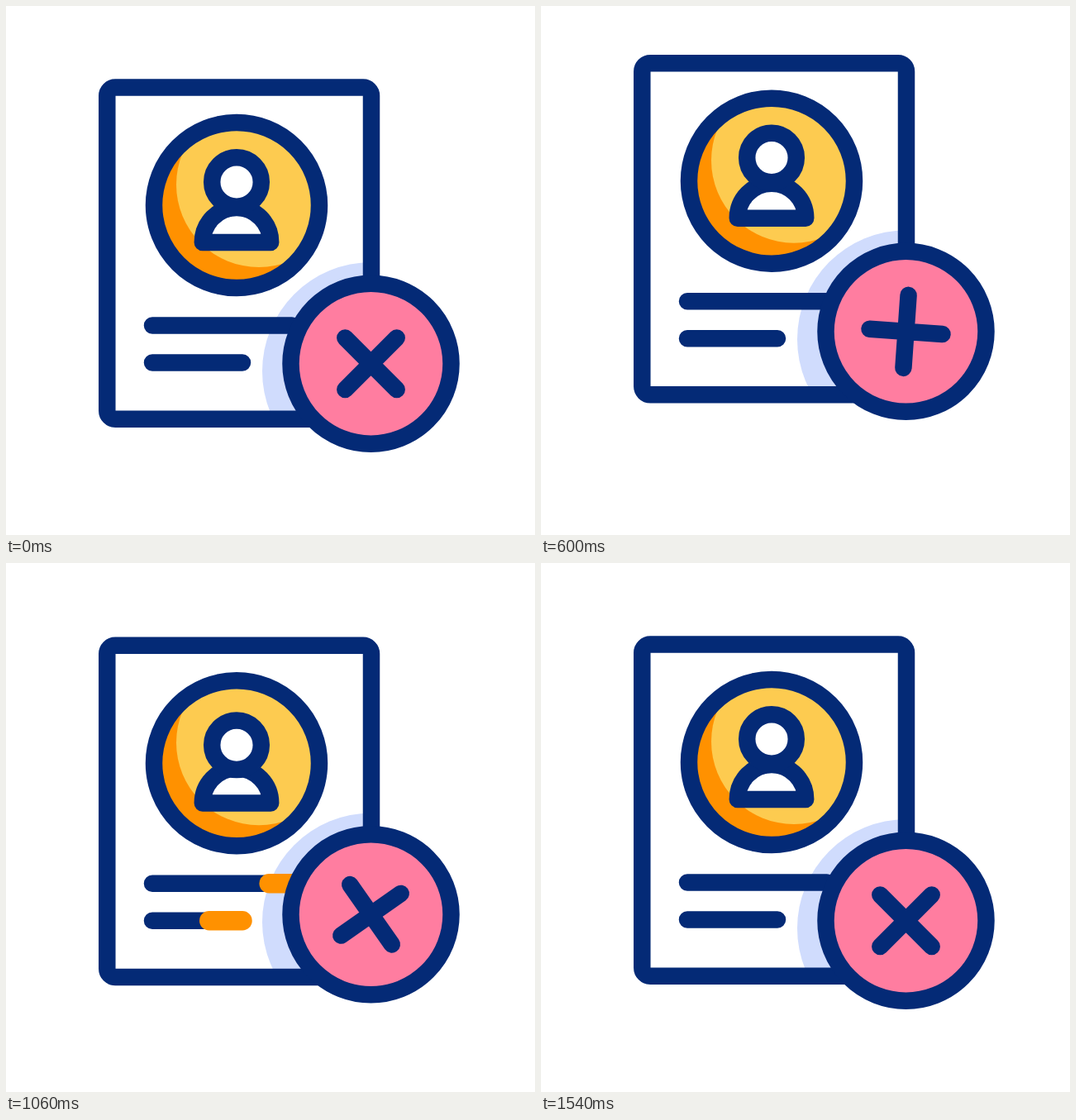
Write an HTML page that moves like this. It is 640 px wide and 640 px high and loops after 1.66 s.

```html
<!DOCTYPE html>
<html lang="en">
<head>
<meta charset="utf-8">
<style>
  html, body { margin: 0; width: 100%; height: 100%; overflow: hidden; background: #fff; }
  svg { display: block; width: 100%; height: 100%; }
  .ink { stroke: #042a76; stroke-width: 20.5; stroke-linecap: round; stroke-linejoin: round; }
  .accent { stroke: #ff9100; stroke-width: 23.5; stroke-linecap: round; }
</style>
</head>
<body>
<svg viewBox="0 0 640 640">
  <defs>
    <clipPath id="page"><rect x="122" y="98" width="320" height="401"/></clipPath>
    <clipPath id="disc"><circle cx="279" cy="241" r="100"/></clipPath>
  </defs>
  <g id="card">
    <g clip-path="url(#page)"><circle id="halo" cx="442" cy="442" r="132" fill="#d0dcfd"/></g>
    <rect class="ink" x="122.3" y="98.5" width="319.7" height="401.2" rx="10" fill="none"/>
    <g clip-path="url(#disc)">
      <circle cx="279" cy="241" r="100" fill="#ff9100"/>
      <circle cx="306" cy="216" r="100" fill="#fdcb50"/>
    </g>
    <circle class="ink" cx="279" cy="241" r="100" fill="none"/>
    <path id="body" class="ink" d="M237.8 286a41.2 42 0 0 1 82.4 0z" fill="#fff"/>
    <circle id="head" class="ink" cx="279" cy="213" r="29.8" fill="#fff"/>
    <path class="ink" d="M177 386.5H346M177 431.5H286"/>
    <line id="sweepLong" class="accent" y1="386.5" y2="386.5"/>
    <line id="sweepShort" class="accent" y1="431.5" y2="431.5"/>
  </g>
  <g id="badge">
    <circle class="ink" cx="441.5" cy="432.7" r="97" fill="#ff7da0"/>
    <path id="cross" class="ink" d="M410.3 401.5l62.4 62.4M472.7 401.5l-62.4 62.4"/>
  </g>
</svg>
<script>
const LOOP = 1660;
const parts = {};
document.querySelectorAll('[id]').forEach(el => parts[el.id] = el);

const ease = u => (1 - Math.cos(Math.PI * Math.min(1, Math.max(0, u)))) / 2;

// Eased value through [time, value] knots, held at both ends.
function track(knots, t) {
  if (t <= knots[0][0]) return knots[0][1];
  for (let i = 1; i < knots.length; i++) {
    const [t0, a] = knots[i - 1], [t1, b] = knots[i];
    if (t < t1) return a + (b - a) * ease((t - t0) / (t1 - t0));
  }
  return knots[knots.length - 1][1];
}

const bounce = [[260, 0], [410, 20], [670, -39], [910, 20], [1170, -10], [1450, 0]];
const bodySway = [[310, 0], [470, 11], [725, -10], [930, 10], [1220, -6], [1520, 0]];
const headSway = [[330, 0], [475, 9.5], [745, -12], [1000, 8], [1250, -6], [1540, 0]];
const spin = [[200, 0], [357, 20], [780, -369], [1210, -343], [1540, -360]];
const BADGE_LEAD = 60;

const shift = (el, y) => el.setAttribute('transform', `translate(0 ${y.toFixed(2)})`);

// A stroke that grows along its line, then drains out at the far end.
function sweep(el, x0, x1, start, t) {
  const from = ease((t - start - 243) / 267);
  const to = ease((t - start) / 267);
  el.setAttribute('x1', x0 + (x1 - x0) * from);
  el.setAttribute('x2', x0 + (x1 - x0) * to);
  el.setAttribute('visibility', to > from ? 'visible' : 'hidden');
}

function render(t) {
  const cardY = track(bounce, t);
  const badgeY = track(bounce, t + BADGE_LEAD);
  shift(parts.card, cardY);
  shift(parts.halo, badgeY - cardY);
  shift(parts.badge, badgeY);
  shift(parts.body, track(bodySway, t));
  shift(parts.head, track(headSway, t));
  parts.cross.setAttribute('transform', `rotate(${track(spin, t).toFixed(2)} 441.5 432.7)`);
  sweep(parts.sweepLong, 177, 346, 622, t);
  sweep(parts.sweepShort, 177, 286, 662, t);
}

const origin = performance.now();
function tick() {
  render((performance.now() - origin) % LOOP);
  requestAnimationFrame(tick);
}
render(0);
requestAnimationFrame(tick);
</script>
</body>
</html>
```
